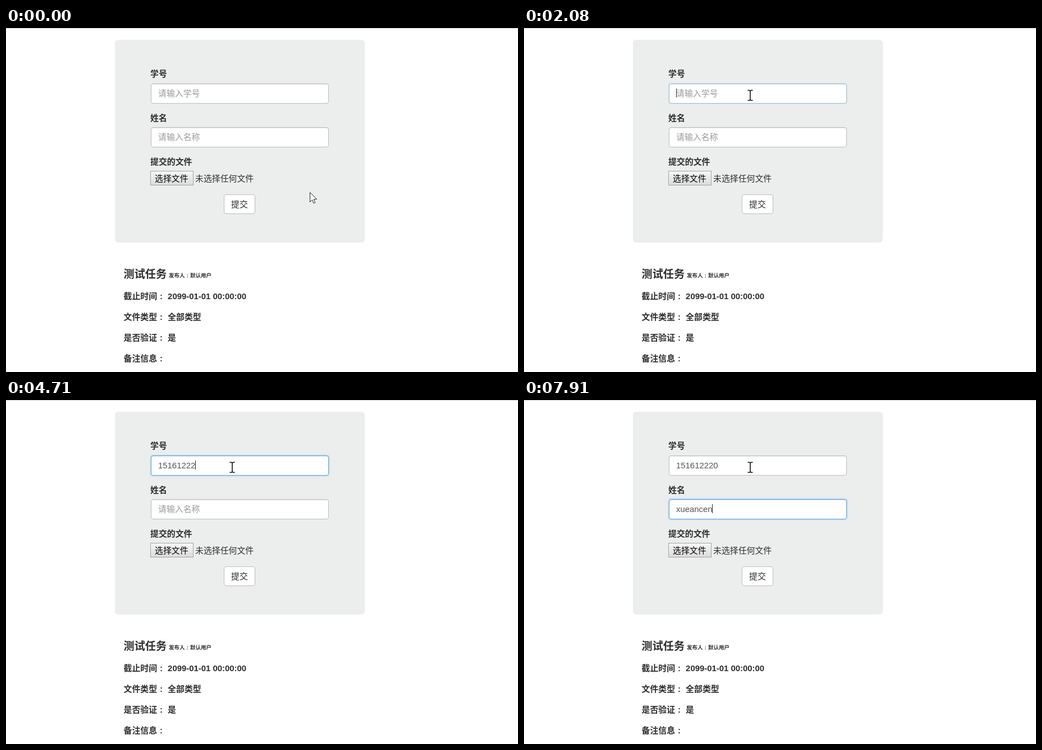
An HTML page that plays this animation: 912x614 px, repeating every 7.99 s.

```html
<!DOCTYPE html>
<html lang="zh-CN">
<head>
<meta charset="utf-8">
<style>
html, body { margin: 0; width: 912px; height: 614px; overflow: hidden; background: #fff; }
body { position: relative; color: #2d2d2d; font: 14.9px "Liberation Sans", "Noto Sans CJK SC", sans-serif; }
div, p, svg { position: absolute; margin: 0; box-sizing: border-box; }
p { line-height: 0; white-space: pre; }
.rule { width: 912px; height: 1px; background: #ccc; }
.panel { left: 194px; top: 21px; width: 445px; height: 362px; border-radius: 6px; background: #ebeeed; }
.bold { font-weight: bold; }
.form { left: 257px; }
.info { left: 209.5px; }
.colon { display: inline-block; width: 1em; text-align: center; }
.field, .submit { border: 1px solid #bcbcbc; border-radius: 4px; background: #fff; }
.field {
  --f: 0;
  left: 258px; width: 317px; height: 36px;
  border-color: color-mix(in srgb, #55a4e6 calc(var(--f) * 100%), #bcbcbc);
  box-shadow: inset 0 1px 1px rgba(0,0,0,.1), 0 0 3px rgba(85,164,230,calc(var(--f) * .7));
}
.value { left: 271px; color: #555; }
.hint { color: #999; }
.caret { position: absolute; top: -9px; margin-left: -.5px; width: 1px; height: 16px; background: #222; }
.choose { left: 257px; top: 255px; width: 77px; height: 26px; border: 1px solid #a3a3a3; background: linear-gradient(#f6f6f6, #dcdcdc); }
.submit { left: 388px; top: 297px; width: 56px; height: 35px; }
.list { left: 257px; top: 135px; width: 319px; height: 56px; border-radius: 0 0 3px 3px; background: #fefefe; box-shadow: 0 1px 3px rgba(0,0,0,.4); }
.list p { left: 14px; top: 28px; font-size: 13.5px; color: #111; }
.ime { left: 271px; top: 128px; width: 34px; height: 33px; border: 2px solid #222; background: #fff; color: #000; font-size: 17px; line-height: 29px; text-align: center; }
svg { left: 0; top: 0; }
</style>
</head>
<body>
<div class="rule"></div>
<div class="panel"></div>

<p class="bold form" style="top:82px">学号</p>
<div class="field" style="top:99px"></div>
<p class="value" style="top:117px"><span></span><i class="caret"></i><span class="hint">请输入学号</span></p>

<p class="bold form" style="top:161px">姓名</p>
<div class="field" style="top:177px"></div>
<p class="value" style="top:195px"><span></span><i class="caret"></i><span class="hint">请输入名称</span></p>

<p class="bold form" style="top:239px">提交的文件</p>
<div class="choose"></div>
<p style="left:265px;top:269px;color:#000">选择文件</p>
<p style="left:337px;top:269px">未选择任何文件</p>
<div class="submit"></div>
<p style="left:401px;top:315px">提交</p>

<p class="bold info" style="top:440px;font-size:19.15px">测试任务</p>
<p class="bold" style="left:290px;top:442px;font-size:9.5px">发布人<span class="colon">:</span>默认用户</p>
<p class="bold info" style="top:479px">截止时间<span class="colon">:</span> 2099-01-01 00:00:00</p>
<p class="bold info" style="top:516px">文件类型<span class="colon">:</span> 全部类型</p>
<p class="bold info" style="top:553px">是否验证<span class="colon">:</span> 是</p>
<p class="bold info" style="top:590px">备注信息<span class="colon">:</span></p>

<div class="list"><p>12</p></div>
<div class="ime">英</div>

<svg width="912" height="614">
  <g id="pointer">
    <path id="arrow" d="M.5.5V17.5L4.5 13.7 7 19.8 9.7 18.7 7.2 12.7H12.5Z" fill="#fff" stroke="#222" stroke-linejoin="round"/>
    <path id="beam" d="M-4.5-8.7h3.2l1.3 1 1.3-1h3.2M0-8V9M-4.5 9.2h3.2l1.3-1 1.3 1h3.2" fill="none" stroke="#111" stroke-width="1.6"/>
  </g>
</svg>

<script>
const LOOP = 7990, BLINK = 520;
const MOVE_START = 70, MOVE_TIME = 1510, MOVE_STEPS = 16;

// Keys are struck at a steady beat; a space is a silent beat
const fields = [
  { focus: 2080, blur: 6420, start: 3310, beat: 200, keys: '15161222   0' },
  { focus: 6420, blur: LOOP, start: 6780, beat: 86, keys: 'xuean     c en' },
];

const all = selector => [...document.querySelectorAll(selector)];
const boxes = all('.field'), values = all('.value');
const [list] = all('.list'), [ime] = all('.ime');
const [pointer, arrow, beam] = all('#pointer, #arrow, #beam');

const ramp = (t, from, duration) => Math.min(1, Math.max(0, (t - from) / duration));
const show = (el, visible) => { el.style.visibility = visible ? 'visible' : 'hidden'; };
const bezier = (s, a, b, c, d) =>
  a * (1 - s) ** 3 + 3 * b * s * (1 - s) ** 2 + 3 * c * s * s * (1 - s) + d * s ** 3;

function drawField({ focus, blur, start, beat, keys }, i, t) {
  const [typed, caret, hint] = values[i].children;
  const struck = keys.slice(0, Math.max(0, Math.floor((t - start) / beat + 1))).trimEnd();
  typed.textContent = struck.replaceAll(' ', '');
  show(hint, !struck);

  // The blink restarts with every key
  const lastAction = struck ? start + beat * (struck.length - 1) : focus - 150;
  const lit = (t - lastAction) % (2 * BLINK) < BLINK;
  show(caret, t >= focus && t < blur && lit);

  const glow = at => ramp(t, at - 40, 150);
  boxes[i].style.setProperty('--f', t < focus ? 0 : glow(focus) - (t < blur ? 0 : glow(blur)));
}

function drawPointer(t) {
  const s = Math.floor(ramp(t, MOVE_START, MOVE_TIME) * MOVE_STEPS) / MOVE_STEPS;
  const x = Math.round(bezier(s, 541, 238, 602, 403));
  const y = Math.round(bezier(s, 293, 300, 120, 120));
  const overField = (y > 98 && y < 135) || (y > 177 && y < 213);
  pointer.setAttribute('transform', `translate(${x} ${y})`);
  show(beam, overField);
  show(arrow, !overField);
}

function render(t) {
  fields.forEach((field, i) => drawField(field, i, t));
  drawPointer(t);
  list.style.opacity = t < 2190 ? 0 : 1 - ramp(t, 3400, 140);
  show(ime, t >= 2190 && t < 3310);
}

const start = performance.now();
function tick() {
  render((performance.now() - start) % LOOP);
  requestAnimationFrame(tick);
}
tick();
</script>
</body>
</html>
```
